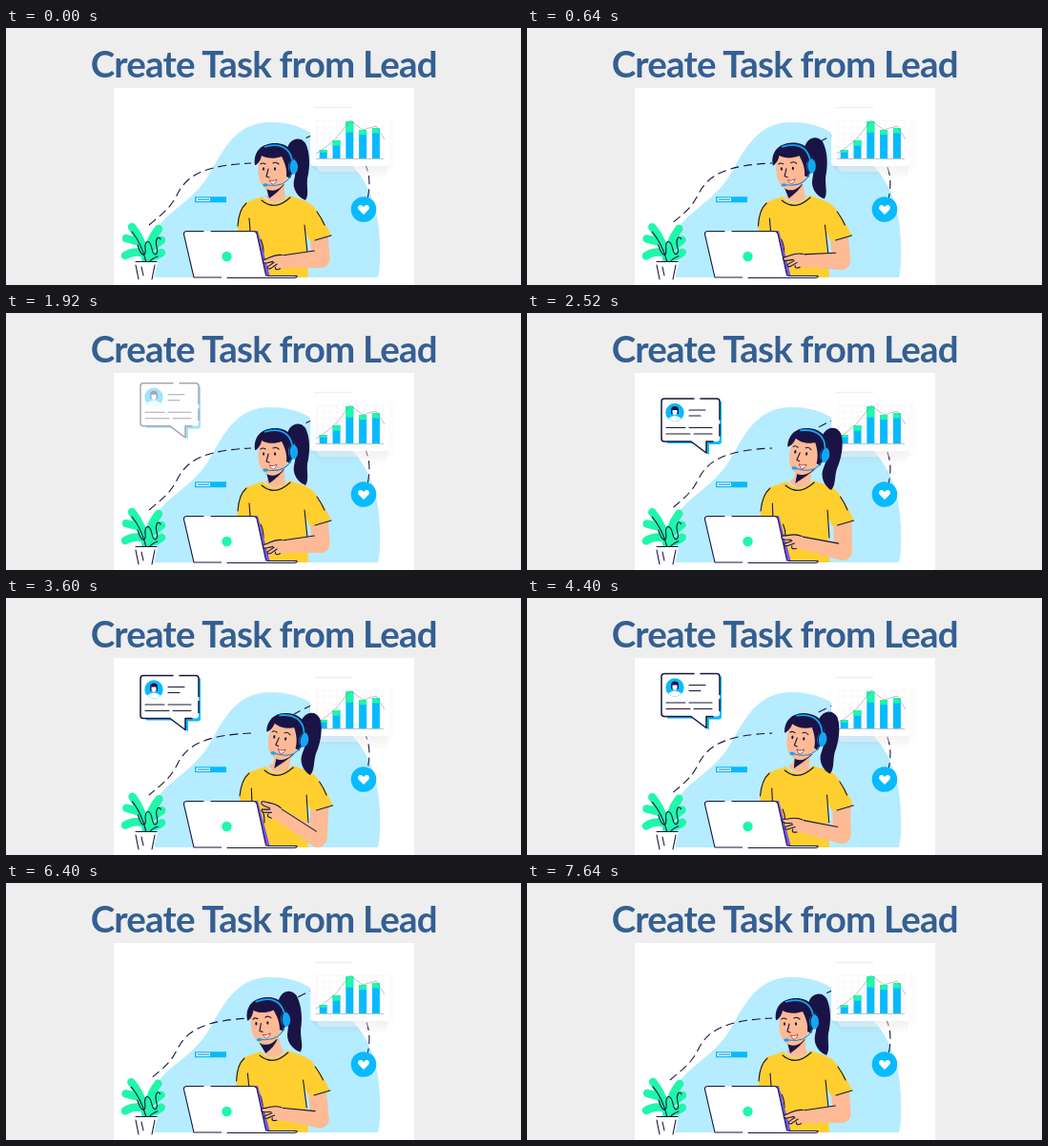
An HTML page that plays this animation: 540x270 px, repeating every 7680 ms.

```html
<!DOCTYPE html>
<html lang="en">
<head>
<meta charset="utf-8">
<title>Create Task from Lead</title>
<style>
  html, body { margin: 0; width: 100%; height: 100%; overflow: hidden; background: #eee; }
  svg { display: block; width: 540px; height: 270px; }
  text { font: 700 38.5px Lato, sans-serif; letter-spacing: -.02em; fill: #345f92; }
  .ink { fill: none; stroke: #17163f; stroke-width: 1.1; stroke-linecap: round; stroke-linejoin: round; }
  .navy { fill: #1a1446; }
  .skin { fill: #fdba95; }
  .blue { fill: #08baff; }
  .green { fill: #1ff7aa; }
  .dash { stroke-dasharray: 9 5; stroke-linecap: butt; }
</style>
</head>
<body>
<svg viewBox="0 0 540 270">
  <defs>
    <clipPath id="card"><path d="M113 63H428V270H113Z"/></clipPath>
    <linearGradient id="shade" x2="0" y2="1">
      <stop stop-color="#889" stop-opacity=".14"/><stop offset="1" stop-color="#889" stop-opacity="0"/>
    </linearGradient>
  </defs>
  <text x="270.3" y="51.6" text-anchor="middle">Create Task from Lead</text>
  <g clip-path="url(#card)">
    <path fill="#fff" d="M113 63H428V270H113Z"/>
    <path fill="#b6ecff" d="M151 262C148 236 150 216 168 199C186 183 202 173 213 154C227 130 240 100 275 99C306 98 323 111 341 126C372 146 391 177 392 226Q393 250 390 262Z"/>
    <path class="ink dash" d="M150 207C164 195 172 190 180 174C190 154 210 144 257 142"/>
    <path class="ink dash" d="M302 122Q311 117 320 113"/>
    <path class="ink dash" d="M376 142Q384 157 379 180"/>

    <!-- chart -->
    <path fill="url(#shade)" d="M320 145H401L398 159H332Z"/>
    <rect x="326" y="93" width="81" height="58" rx="5" fill="#fff5f6" opacity=".4"/>
    <rect x="319" y="91" width="82" height="54" rx="4" fill="#fff" opacity=".94"/>
    <path id="grid" fill="none" stroke="#faeef0" stroke-width=".6"/>
    <path stroke="#faebee" stroke-width="1.6" d="M323 83.5H363"/>
    <g id="bars"></g>
    <path fill="none" stroke="#789" stroke-width=".5" d="M325 132L333 127L346 116L361 97L374 107L388 103L397 117M325 137.5H396"/>

    <circle class="blue" cx="375" cy="190.5" r="13.3"/>
    <path fill="#fff" d="M375 196L370 191C367 187 372 183.500 375 188C378 183.500 383 187 380 191Z"/>

    <!-- progress -->
    <path class="blue" d="M198 177.200H231V183.300H198Z"/>
    <path stroke="#e9f9ff" stroke-width="3.6" d="M199.500 180.200H214"/>
    <path stroke="#168bd0" d="M201 180.200H213"/>

    <!-- plant -->
    <g id="plant">
      <path fill="none" stroke="#1ff7aa" stroke-width="8.5" stroke-linecap="round" d="M147 245Q144 224 132 209M141 225L126 221M143 236Q133 234 125 239M149 244Q148 226 160 211M152 231L163 223M151 241Q158 240 163 236"/>
      <path class="ink" d="M132 214Q142 226 147 246M138 228C142 241 147 241 146 232C145 222 151 222 153 232C155 242 160 238 158 230C156 222 160 217 162 222M150 246Q153 242 159 240"/>
    </g>
    <path fill="#fff" d="M135 246H159L155 264H139Z"/>
    <path class="ink" d="M136 245.500H158M136 249L139 264M156 249L153 264M142 251L144 260"/>

    <!-- person -->
    <path id="upperArm" fill="none" stroke="#fdba95" stroke-width="19" stroke-linecap="round"/>
    <path id="neck" fill="none" stroke="#fdba95" stroke-width="17"/>
    <g id="body">
      <path fill="#ffcf30" d="M269 177Q282 191 297 176L309 180Q320 183 326 192Q334 203 341 218L319 224L314 215L317 262H260L256 214H243Q242 190 252 183Z"/>
      <path class="skin" d="M272 177Q283 190 294 176Q286 173 275 174Z"/>
      <path class="ink" d="M268 181Q282 193 298 178M252 184Q244 191 243 208M255 200L256 213M313 207L316 236M326 193Q331 200 334 207M341 218L324 223M267 222Q270 228 270 236"/>
    </g>
    <path id="neckShade" class="navy"/>
    <g id="head">
      <path class="navy" d="M295 126C298 116 308 113 314 121C319 131 319 146 316 158C315 168 318 175 314 181C306 178 300 169 302 160C305 148 305 134 295 126Z"/>
      <path class="skin" d="M265 138C263 154 265 166 275 170C284 173 292 166 296 155L297 138L270 130Z"/>
      <path class="navy" d="M261 144C259 130 268 121 282 121C297 121 304 131 303 146L298 158L294 156C295 148 292 141 289 135C281 138 273 137 268 134Q267 140 262 144Z"/>
      <path fill="none" stroke="#12a7f5" stroke-width="1.8" d="M300 139C298 126 287 120 271 125"/>
      <ellipse cx="301" cy="146" rx="5" ry="7.8" fill="#12a7f5"/>
      <path class="ink" d="M299 139Q295 146 299 153"/>
      <path fill="none" stroke="#1689d0" d="M299 154Q293 168 274 165"/>
      <ellipse cx="272" cy="165" rx="2.8" ry="1.7" fill="#12a7f5"/>
      <g class="navy"><ellipse cx="270" cy="148" rx="1.1" ry="1.8"/><ellipse cx="282" cy="148" rx="1.1" ry="1.8"/></g>
      <path class="ink" d="M267 143Q269 141 272 143M280 142Q283 140 286 143M275 148L273 156L276 157"/>
      <path fill="#fff" stroke="#a2344c" stroke-width=".8" d="M276 160Q280 162 284 159Q282 165 279 164Z"/>
    </g>

    <!-- laptop -->
    <path fill="#7952ef" d="M260 213H264L277 262H270Z"/>
    <path fill="#fff" d="M187 213.500H259Q262 213.500 263 216L273 262H197Z"/>
    <path class="ink" d="M197 262L186.500 217Q186 213.500 190 213.500H207M215 213.500H259Q262 213.500 263 216L273 262M197 262H229"/>
    <circle class="green" cx="231.500" cy="240" r="5.2"/>
    <path fill="#fff" d="M226 260.500H306Q306 264 301 264H226Z"/>
    <path class="ink" d="M232 262.500H302Q306 262 305 260.500H274"/>

    <!-- forearm -->
    <path id="forearm" class="skin"/>
    <path id="armLine" class="ink"/>
    <g id="hand">
      <path class="skin" d="M18 -7C9 -9 4 -5 -1 -4C-5 -3 -4 0 0 0L7 -1L1 4Q0 7 4 6L10 3L8 7Q10 9 14 7L21 6Z"/>
      <path class="ink" d="M17 -7C9 -9 4 -5 -1 -4C-5 -3 -4 0 0 0L7 -1M8 0L1 4Q0 7 4 6L11 2M9 5Q8 9 14 7"/>
    </g>

    <!-- message -->
    <g id="bubble">
      <path class="blue" d="M147 93H204V135Q204 138 201 138H191V149L174 137H147Z"/>
      <path fill="#fff" d="M144 90H199Q202 90 202 93V132Q202 135 199 135H188V147L172 135H144Q141 135 141 132V93Q141 90 144 90Z"/>
      <path class="ink" style="stroke-width:1.5" d="M175 90H144Q141 90 141 93V132Q141 135 144 135H172L188 147V135H195M182 90H199Q202 90 202 93V112M202 117V129"/>
      <circle class="blue" cx="155" cy="104.500" r="9.7"/>
      <path fill="#fff" d="M148 111Q155 105 162 111Q155 117 148 111Z"/>
      <path class="navy" d="M151 106V102Q151 98 155 98Q159 98 159 102V106Z"/>
      <path fill="#fff" d="M152.500 102H157.500V105Q155 110 152.500 105Z"/>
      <path class="ink" d="M170 102H187M170 108H182M146 120.500H166M170 120.500H194M146 127H171M175 127H194"/>
    </g>
  </g>
</svg>
<script>
const LOOP = 7680;
const $ = id => document.getElementById(id);
const set = (id, attrs) => Object.entries(attrs).forEach(([k, v]) => $(id).setAttribute(k, v));

// Smooth rise from 0 to 1 between two times.
function ramp(t, start, end) {
  const p = Math.min(1, Math.max(0, (t - start) / (end - start)));
  return p * p * (3 - 2 * p);
}

let grid = "";
for (let x = 326; x < 398; x += 7) grid += `M${x} 96V137`;
for (let y = 97; y < 137; y += 7) grid += `M325 ${y}H397`;
set("grid", { d: grid });

const barHeights = [9, 19, 39, 30, 32];
$("bars").innerHTML = barHeights.map((h, i) => {
  const x = 328.7 + i * 13.8;
  const bar = (color, height) => `<rect class="${color}" x="${x}" y="${137 - h}" width="8" height="${height}"/>`;
  return bar("blue", h) + bar("green", i < 3 ? h * .3 : h * .17);
}).join("");

function drawArm(sway, lean, raise) {
  const effort = Math.abs(sway);
  const hx = 273 - 3 * effort;
  const hy = 247 - 9 * effort - 20 * raise;
  const ex = 330 + lean * .4 - 4 * raise;
  const ey = 242 + 8 * effort + 2 * raise;
  const angle = Math.atan2(ey - hy, ex - hx);
  const nx = -Math.sin(angle), ny = Math.cos(angle);
  const wx = hx + 17 * Math.cos(angle), wy = hy + 17 * Math.sin(angle);
  const at = (x, y, w) => `${x + nx * w} ${y + ny * w}`;
  set("upperArm", { d: `M${328 + lean - 2 * raise} 215L${ex} ${ey}` });
  set("forearm", { d: `M${at(wx, wy, -6)}L${at(ex, ey, -9)}A9.5 9.5 0 0 1 ${at(ex, ey, 10)}L${at(wx, wy, 6)}Z` });
  set("armLine", { d: `M${at(wx, wy, -6.5)}L${at(ex - 6, ey, -8)}` });
  set("hand", { transform: `translate(${hx} ${hy}) rotate(${angle * 180 / Math.PI})` });
}

function draw(t) {
  // Negative leans to the screen, positive leans back.
  const sway = 1.7 * ramp(t, 1500, 2450) - .7 * ramp(t, 200, 1200) - ramp(t, 4000, 5200)
    - .7 * ramp(t, 5300, 6300) + .7 * ramp(t, 6600, 7600);
  const dx = sway * 10.5, lean = sway * 3;
  set("head", { transform: `translate(${dx} ${-Math.abs(sway)}) rotate(${sway * (sway > 0 ? 10 : 6)} 277 152)` });
  set("body", { transform: `translate(${lean * 3.275}) skewX(${-Math.atan(lean / 80) * 180 / Math.PI})` });
  set("neck", { d: `M${283 + dx * .8} 162L${284 + lean} 181` });
  set("neckShade", { d: `M${273 + dx} 168L${292 + dx} 164Q${286 + dx * .6} 172 ${276 + dx * .5} 179Z` });
  drawArm(sway, lean, ramp(t, 2900, 3500) - ramp(t, 3900, 4600));

  const enter = ramp(t, 1650, 2300), leave = ramp(t, 5650, 6250);
  const lift = ramp(t, 2700, 3950) - ramp(t, 4500, 5400);
  set("bubble", {
    transform: `translate(0 ${-26 * (1 - enter + leave) - 10.5 * lift})`,
    opacity: enter * (1 - leave)
  });

  const phase = t / LOOP;
  set("plant", { transform: `rotate(${-Math.sin(phase * Math.PI * 8) * 1.2} 147 246)` });
  for (const line of document.querySelectorAll(".dash")) line.style.strokeDashoffset = -phase * 56;
}

function frame(now) {
  draw(now % LOOP);
  requestAnimationFrame(frame);
}
draw(0);
requestAnimationFrame(frame);
</script>
</body>
</html>
```
